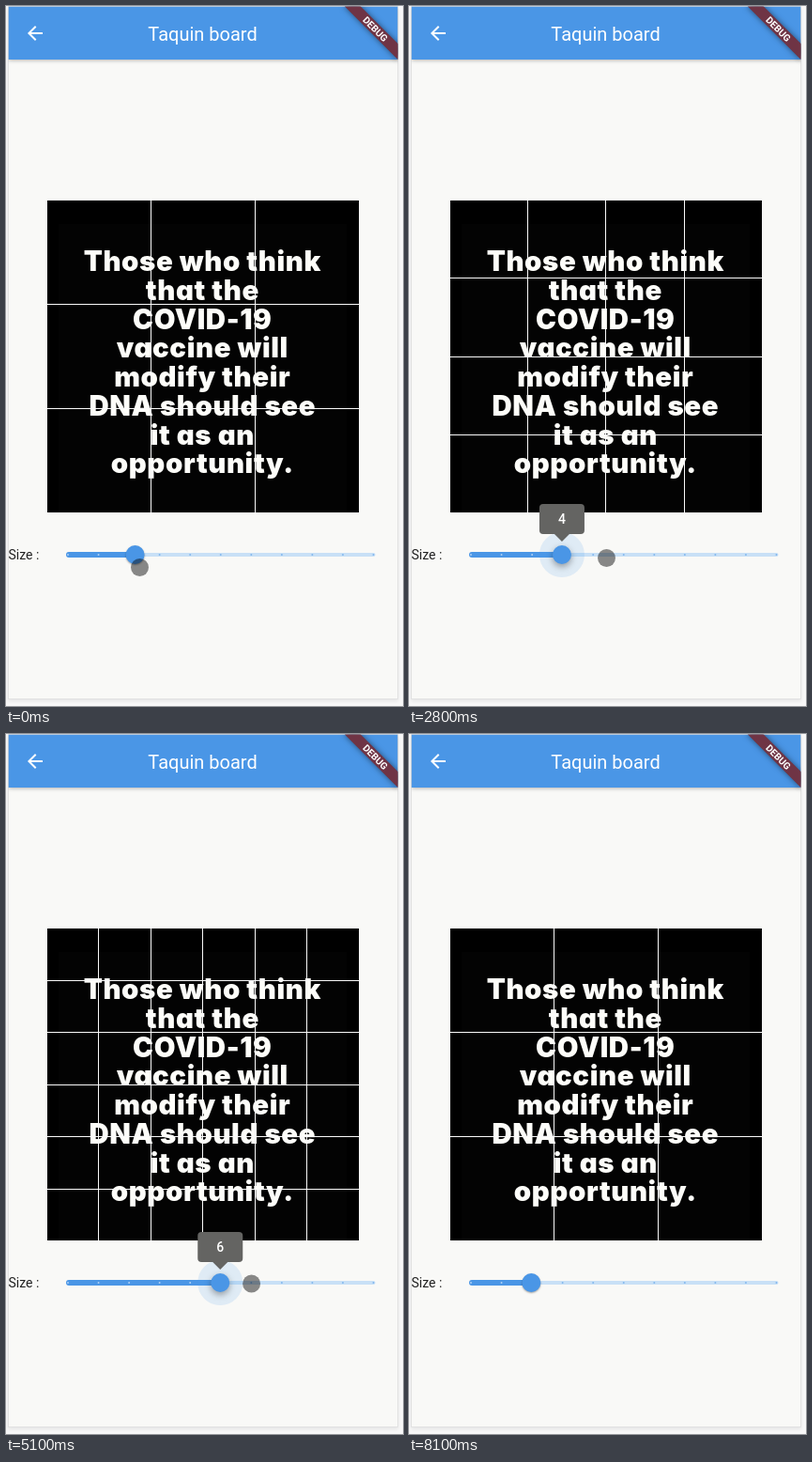
Write an HTML page with a canvas that moves like this. It is 423 px wide and 745 px high and loops after 8.3 s.

```html
<!DOCTYPE html>
<html lang="en">
<head>
<meta charset="utf-8">
<title>Taquin board</title>
<style>
  html, body { margin: 0; width: 423px; height: 745px; overflow: hidden; background: #f8f8f8; }
  #page { position: absolute; left: 2px; top: 0; width: 414px; height: 736px; background: #f9f9f7;
          border: 1px solid #e2e2e2; box-shadow: 0 2px 4px rgba(0, 0, 0, .08); }
  svg, canvas { position: absolute; left: 0; top: 0; display: block; }
  svg text { font: 900 29.4px Inter, sans-serif; letter-spacing: .6px; font-feature-settings: "cv11";
             fill: #fdfdf9; text-anchor: middle; }
</style>
</head>
<body>
<div id="page"></div>
<svg id="quote" width="423" height="745">
  <rect x="44" y="207" width="332" height="332"/>
  <rect x="56" y="232" width="307" height="307" fill="#030303"/>
</svg>
<canvas id="stage" width="423" height="745"></canvas>
<script>
const LOOP = 8300, STEP = 100;
const BLUE = '#4a96e6';
const BOARD = { x: 44, y: 207, size: 332 };
const GRID = { x: 43.45, y: 206.55, size: 333 };
const TRACK = { x: 65, y: 584, width: 326.5, divisions: 10 };
const QUOTE = ['Those who think', 'that the', 'COVID-19', 'vaccine will',
  'modify their', 'DNA should see', 'it as an', 'opportunity.'];

// Pointer stops: arrival time, x, y
const STOPS = [
  [400, 142, 597], [700, 131, 584], [1600, 220, 580], [1800, 155, 580], [2100, 220, 579],
  [2800, 210, 587], [3800, 322, 580], [3900, 341, 579], [4300, 292, 585], [4600, 270, 584],
  [5700, 175, 590], [6600, 170, 615], [7300, 77, 156], [7900, 37, 9]
];
const POINTER_END = 8100;

const ctx = document.getElementById('stage').getContext('2d');
const quote = document.getElementById('quote');

QUOTE.forEach((words, i) => {
  const line = document.createElementNS(quote.namespaceURI, 'text');
  line.setAttribute('x', 209.3);
  line.setAttribute('y', 282.3 + 30.7 * i);
  line.textContent = words;
  quote.append(line);
});

const ramp = (t, from, to) => Math.min(1, Math.max(0, (t - from) / (to - from)));

// The pointer lingers at each stop, then speeds up towards the next.
function pointerAt(t) {
  const next = STOPS.findIndex(stop => stop[0] > t);
  if (next === 0) return STOPS[0].slice(1);
  if (next < 0) return STOPS[STOPS.length - 1].slice(1);
  const [t0, x0, y0] = STOPS[next - 1], [t1, x1, y1] = STOPS[next];
  const p = ramp(t, t0, t1) ** 3;
  return [x0 + (x1 - x0) * p, y0 + (y1 - y0) * p];
}

// The first press snaps 3 to the nearest division; the drag goes five divisions up and back.
function valueAt(t) {
  if (t < 1000) return 3;
  const up = ramp(t, 2300, 3600) ** 2, down = ramp(t, 4700, 5600);
  return 1 + .9 * (2 + Math.round(5 * (up - down)));
}

const pressAt = t => ramp(t, 900, 1100) - ramp(t, 6300, 6500);

function disc(x, y, r, fill) {
  ctx.fillStyle = fill;
  ctx.beginPath();
  ctx.arc(x, y, r, 0, Math.PI * 2);
  ctx.fill();
}

function pill(x, y, w, h, r, fill) {
  ctx.fillStyle = fill;
  ctx.beginPath();
  ctx.roundRect(x, y, w, h, r);
  ctx.fill();
}

function label(text, x, y, font, color, align = 'center') {
  ctx.font = font + ' Roboto, sans-serif';
  ctx.fillStyle = color;
  ctx.textAlign = align;
  ctx.fillText(text, x, y);
}

function shadow(color, blur, dy = 0) {
  ctx.shadowColor = color;
  ctx.shadowBlur = blur;
  ctx.shadowOffsetY = dy;
}

function isolated(draw) {
  ctx.save();
  draw();
  ctx.restore();
}

const arrow = new Path2D('M20 11H7.83l5.59-5.59L12 4l-8 8 8 8 1.41-1.41L7.83 13H20z');

function drawAppBar() {
  isolated(() => {
    ctx.beginPath();
    ctx.rect(2.5, .5, 415, 70);
    ctx.clip();
    isolated(() => {
      shadow('rgba(0,0,0,.28)', 4, 1);
      ctx.fillStyle = BLUE;
      ctx.fillRect(2.5, .5, 415, 56.5);
    });
    label('Taquin board', 209.5, 37, '400 20px', '#fff');
    isolated(() => {
      ctx.translate(19, 17);
      ctx.fillStyle = '#fff';
      ctx.fill(arrow);
    });
    ctx.translate(417.5, .5);
    ctx.rotate(Math.PI / 4);
    isolated(() => {
      shadow('rgba(0,0,0,.5)', 6);
      ctx.fillStyle = '#6f3445';
      ctx.fillRect(-40, 28, 80, 12);
    });
    label('DEBUG', 0, 37.6, '700 10.2px', '#fff');
  });
}

function drawGrid(count) {
  ctx.fillStyle = '#fafafa';
  for (let i = 1; i < count; i++) {
    const d = GRID.size * i / count;
    ctx.fillRect(Math.floor(GRID.x + d), BOARD.y, 1, BOARD.size);
    ctx.fillRect(BOARD.x, Math.floor(GRID.y + d), BOARD.size, 1);
  }
}

function drawBubble(x, text, scale) {
  isolated(() => {
    ctx.translate(x, TRACK.y);
    ctx.scale(scale, scale);
    pill(-24, -54, 48, 32, 4, '#646462');
    ctx.beginPath();
    ctx.moveTo(-8, -22);
    ctx.lineTo(8, -22);
    ctx.lineTo(0, -14);
    ctx.fill();
    label(text, 0, -33, '500 14px', '#fff');
  });
}

function drawSlider(value, press) {
  const { x, y, width, divisions } = TRACK;
  const thumb = x + width * (value - 1) / 9;
  label('Size :', 2.5, 589, '400 14px', '#222', 'left');
  pill(thumb, y - 2, x + width + 2 - thumb, 4, 2, '#c8e0f6');
  pill(x - 1, y - 3, thumb - x + 1, 6, 3, BLUE);
  for (let i = 0; i <= divisions; i++) {
    const tick = x + 1 + (width - 1) * i / divisions;
    disc(tick, y, 1, tick < thumb ? 'rgba(255,255,255,.54)' : 'rgba(74,150,230,.54)');
  }
  if (press) disc(thumb, y, 24 * press, 'rgba(74,156,232,.15)');
  isolated(() => {
    shadow('rgba(0,0,0,.35)', 2 + 5 * press, 1 + 2 * press);
    disc(thumb, y, 10, BLUE);
  });
  if (press) drawBubble(thumb, Math.round(value), press);
}

function drawPointer(t) {
  if (t >= POINTER_END) return;
  const [x, y] = pointerAt(t);
  disc(x + .5, y + .5, 9.5, 'rgba(0,0,0,.46)');
}

function frame(now) {
  const t = Math.floor(now % LOOP / STEP) * STEP;
  const value = valueAt(t);
  ctx.clearRect(0, 0, 423, 745);
  drawAppBar();
  drawGrid(Math.round(value));
  drawSlider(value, pressAt(t));
  drawPointer(t);
  requestAnimationFrame(frame);
}
requestAnimationFrame(frame);
</script>
</body>
</html>
```
